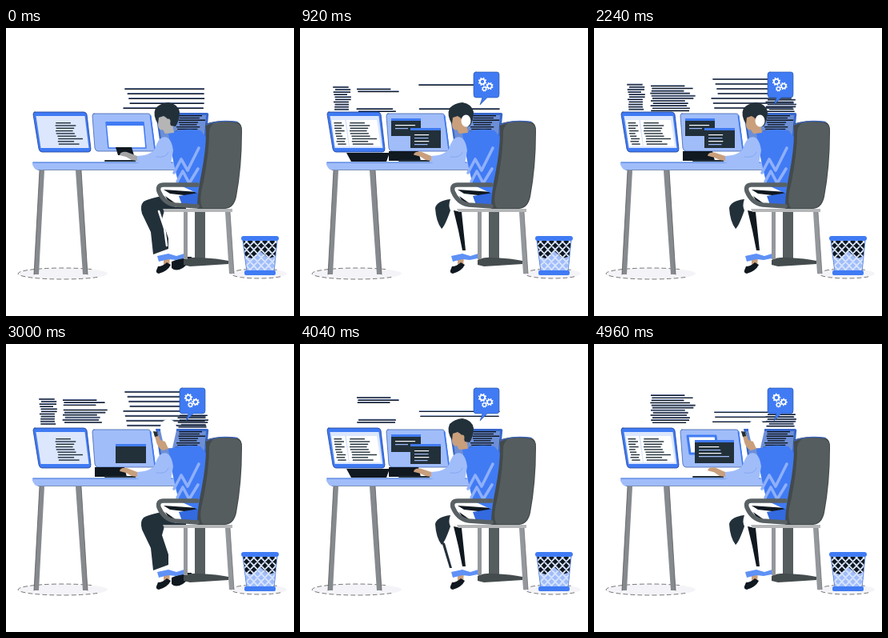
These frames come from a looping animation (360x360 px, 5 s). An HTML page with a canvas:

```html
<!DOCTYPE html>
<html lang="en">
<head>
<meta charset="utf-8">
<title>Programmer at work</title>
<style>
html, body { margin: 0; width: 100%; height: 100%; overflow: hidden; background: #fff; }
canvas { display: block; width: 100vmin; height: 100vmin; }
</style>
</head>
<body>
<canvas id="stage" width="360" height="360"></canvas>
<script>
const ctx = document.getElementById('stage').getContext('2d');
const LOOP = 5000;
const BLUE = '#407bf4', PALE = '#a0bdfa', ICE = '#dce7fd', INK = '#22303a', NIGHT = '#101820';
const GREY = '#868a8e', CHAIR = '#555d5f', SKIN = '#c99f7c', WHITE = '#fff';

// Scene phases switch hard at these times.
const CUTS = [460, 1280, 1940, 2620, 3520, 4500];
const phaseAt = t => CUTS.filter(cut => t >= cut).length;
const noise = n => { const s = Math.sin(n * 127.1 + 11.7) * 43758.5453; return s - Math.floor(s); };

function shape(d, fill, stroke, width = 1) {
  const path = new Path2D(d);
  if (fill) { ctx.fillStyle = fill; ctx.fill(path); }
  if (stroke) {
    ctx.strokeStyle = stroke;
    ctx.lineWidth = width;
    ctx.lineCap = ctx.lineJoin = 'round';
    ctx.stroke(path);
  }
}
function rect(x, y, w, h, fill, r = 0) {
  ctx.fillStyle = fill;
  ctx.beginPath();
  ctx.roundRect(x, y, w, h, r);
  ctx.fill();
}
function oval(x, y, rx, ry, fill) {
  ctx.fillStyle = fill;
  ctx.beginPath();
  ctx.ellipse(x, y, rx, ry, 0, 0, 7);
  ctx.fill();
}
function textRows(x, y, w, count, pitch, color, seed, slant = 0) {
  for (let i = 0; i < count; i++) {
    const indent = noise(seed + i) * w * 0.15;
    const length = (w - indent) * (0.6 + 0.4 * noise(seed + i + 40));
    rect(x + indent + i * slant, y + i * pitch, length, 1.4, color);
  }
}

// Rows of floating code: one mask per phase, drifting slowly upward.
const BLOCKS = [
  { x: 41, w: 23, top: 75, speed: 2.4, pitch: 3.1, seed: 3, ragged: 0.3, indent: 3,
    masks: ['', '1111111111', '1111111111', '11111111111', '11111111111', '', ''] },
  { x: 70, w: 58, top: 78, speed: 3, pitch: 3.1, seed: 17, ragged: 0.3, indent: 4,
    masks: ['', '1100000011', '1111111111', '11111111111', '1110111111', '11100000011', '111111111111'] },
  { x: 144, w: 107, top: 75, speed: 5.4, pitch: 6, seed: 31, ragged: 0.04, indent: 14,
    masks: ['11111', '1000011', '111101', '11111111', '11111111', '0000011', '000000111'] },
  { x: 214, w: 39, top: 90, speed: 0.6, pitch: 2.9, seed: 53, ragged: 0.1, indent: 5,
    masks: ['', '', '00011', '111111', '111111', '', '111111'] }
];
function floatingCode(t) {
  for (const block of BLOCKS) {
    for (let i = 0; i < 12; i++) {
      const shift = t < 250 || t > 4750 ? 0 : (noise(block.seed + i) - 0.5) * 360;
      if (block.masks[phaseAt(t + shift)][i] !== '1') continue;
      const y = block.top - block.speed * t / 1000 + i * block.pitch;
      if (y > 104) continue;
      const left = noise(block.seed + i) * block.indent;
      const right = noise(block.seed + i + 60) * block.w * block.ragged;
      const length = block.w - left - right;
      rect(block.x + left, y, length, 1.7, '#7187bd');
      rect(block.x + left, y + 0.7, length, 1.2, NIGHT);
    }
  }
}

function shadow(x, rx, ry) {
  oval(x, 307, rx, ry, '#f4f4f8');
  ctx.save();
  ctx.setLineDash([5, 4]);
  ctx.strokeStyle = '#555';
  ctx.lineWidth = 0.8;
  ctx.beginPath();
  ctx.ellipse(x, 307, rx, ry, 0, 0.7, 5.4);
  ctx.stroke();
  ctx.restore();
}

function desk() {
  shadow(71, 56, 7);
  shadow(316, 35, 6);
  shape('M42 178H48L41 308H35ZM87 178H94L102 308H96Z', GREY);
  shape('M42 178L35 308M94 178L102 308', null, '#4d4d4d', 0.7);
  shape('M33 167.5H225V177.5H39Q36 177 33 171Z', PALE);
  shape('M34 168.2H208', null, '#5b87df', 1.2);
  shape('M40 177.5H212', null, '#667ba8', 0.8);
}

function leftMonitor(phase) {
  shape('M36 105H97Q100 105 101 108L106 151Q106 155 103 155H45Q42 155 41 151L34 108Q34 105 36 105Z', BLUE, '#1d3f91', 0.8);
  shape('M37.5 110H98.5L103.5 150H43.5Z', ICE);
  const plain = phase === 0 || phase === 4;
  if (!plain) {
    shape('M40 115H56L61 148H44ZM58 115H96L101 148H62Z', WHITE);
    textRows(41.5, 118, 13, 9, 3.3, INK, 71, 0.5);
  }
  textRows(58, 118, 35, 9, 3.3, INK, 83, 0.5);
}

function editor(x, y, w, h, lines) {
  rect(x, y, w, h, INK);
  rect(x, y, w, 3, BLUE);
  for (let i = 0; i < lines; i++)
    rect(x + 5, y + 8 + i * 4, (w - 11) * (0.6 + 0.4 * noise(x + i)), 1.2, i % 2 ? PALE : WHITE);
}
function middleMonitor(phase) {
  shape('M110 107H178Q180 107 181 110L186 150Q186 154 183 154H115Q112 154 111 150L108 110Q108 107 110 107Z', PALE, '#3f62ae', 0.8);
  shape('M180.5 110L186 151', null, BLUE, 1.8);
  if (phase === 0) {
    shape('M125 118H172L175 150H128Z', WHITE, BLUE, 1.5);
    shape('M125 117H172L173 122H126Z', BLUE);
  } else if (phase === 4) {
    editor(137, 125, 38, 24, 0);
  } else if (phase === 6) {
    shape('M117 115H152L155 137H120Z', WHITE, BLUE, 3);
    editor(126, 120, 49, 29, 4);
  } else {
    editor(114, 113, 37, 22, 2);
    editor(138, 125, 38, 25, 4);
  }
}

function rightMonitor() {
  shape('M187 106H251Q254 106 253 110L249 154H194Z', '#3867cb');
  shape('M190 109H250L247 146H195Z', '#6d8fd6');
  textRows(212, 109, 39, 9, 2.8, NIGHT, 91, -0.2);
}

function deskGear(phase) {
  if (phase === 1 || phase === 5) shape('M58 156H112L108 167H64Z', NIGHT);
  if (phase === 0) shape('M137 149H157L160 159H140Z', NIGHT);
  else if (phase < 6) shape('M111 154H148L151 166H111Z', NIGHT);
  shape('M124 166H166', null, INK, 2);
}

function gear(x, y, r, angle) {
  ctx.save();
  ctx.translate(x, y);
  ctx.rotate(angle);
  for (let i = 0; i < 8; i++) {
    ctx.rotate(Math.PI / 4);
    rect(-r * 0.22, -r * 1.3, r * 0.44, r * 0.6, WHITE);
  }
  oval(0, 0, r, r, WHITE);
  oval(0, 0, r * 0.55, r * 0.55, BLUE);
  ctx.restore();
}
function bubble(t) {
  if (t < 600) return;
  shape('M220 55H246Q249 55 249 58V83Q249 87 246 87H234L225 96L228 87H220Q217 87 217 83V58Q217 55 220 55Z', BLUE, '#24519f', 0.6);
  const turn = t / LOOP * Math.PI * 2;
  gear(228, 67, 4, turn);
  gear(237, 72.5, 3.6, -turn);
  gear(230.5, 76, 2.7, -turn);
}

function legs(phase) {
  if (phase === 0 || phase === 4) {
    shape('M225 206Q184 210 172 217Q167 222 170 232L181 255L184 283L203 276L203 263L195 239L198 228H225Z', INK);
    if (phase === 0) shape('M191 229L198 250L201 272', null, WHITE, 2.5);
  } else {
    shape('M188 214Q171 216 169 225Q170 242 177 251Q181 248 188 228Q185 222 188 214Z', INK);
    shape('M192 228L202 230L207 278H203L198 253Z', NIGHT);
    if (phase === 5) shape('M177 247L181 249L190 280H187Z', INK);
  }
  shape('M197 285H205L204 298H197Z', SKIN);
  shape('M190 298Q196 298 201 293L206 296Q202 304 191 307Q187 306 188 303Z', NIGHT);
  shape('M207 292L223 286L232 286V291L221 300Q212 305 207 300Z', phase === 0 || phase === 4 ? NIGHT : WHITE);
  shape('M189 285L203 282L213 285L226 281L227 287L212 290L203 289L191 292Z', '#5f91f6');
}

function head(phase) {
  const hidden = phase === 4 || phase === 6;
  if (hidden) {
    shape('M193 108Q192 95 203 94Q214 95 213 108L208 130H198Z', WHITE);
    shape('M184 109L189 110L193 120L199 122L203 131L196 133Q189 130 187 119Z', SKIN);
    shape('M184 109L189 110L190 115L186 116Z', INK);
    return;
  }
  const face = phase === 0 ? '#b5b5b5' : SKIN;
  shape('M190 111L198 107L207 114L210 131L199 132L196 127Q191 129 190 121Z', face);
  shape('M187 100Q193 94 203 93Q215 95 217 105Q217 115 212 123L206 122Q204 113 197 110L191 112L190 120Q183 109 187 100Z', INK);
  if (phase > 0 && phase < 4) oval(207.5, 116, 6, 7.5, WHITE);
  else oval(203, 117, 2.5, 3.5, face);
}

function person(t, phase) {
  legs(phase);
  shape('M194 202Q215 198 240 201V224H212Q199 218 194 202Z', WHITE);
  shape('M197 202L240 205V211L205 207ZM199 210L213 220H205Z', NIGHT);
  shape('M216 210L241 206V223L220 221Z', '#336ae0');
  shape('M203 132Q222 124 243 128L253 140L242 208L216 196Q208 165 203 132Z', BLUE);
  shape('M210 181L219 164L227 178L241 150M214 192L221 179L229 194L240 176', null, '#8fb0fa', 3.6);

  head(phase);

  shape('M195 137Q206 133 209 153L206 170Q200 176 188 173L162 168V160Q182 160 187 149Q190 139 195 137Z', PALE);
  shape('M188 161Q201 163 203 155', null, '#7fa3eb', 0.8);
  const tap = Math.sin(t / 100 * Math.PI) * 0.7;
  shape(`M164 160L151 ${155 + tap}Q143 ${154 + tap} 142 ${159 + tap}L150 ${161 + tap}L157 165L164 166Z`, phase ? SKIN : '#a5a5a5');
}

function chair() {
  shape('M236 229H249V288L255 292H236Z', CHAIR);
  shape('M222 290Q230 286 242 287Q265 288 278 291V295L247 297L230 298L222 296Z', '#454c4e');
  shape('M222 230H227V289H222ZM274 230H280L285 307H279Z', '#94989c');
  shape('M280 230L285 307', null, '#666', 0.7);
  shape('M249 120Q265 114 288 117Q296 119 295 130Q295 174 288 211Q285 225 274 226H239Q239 206 244 183Q250 153 250 130Z', '#434a4c');
  shape('M263 118Q276 116 288 119Q295 121 294 130Q294 174 287 210Q284 224 273 225H246Q240 218 247 192Q254 155 254 129Q256 119 263 118Z', CHAIR);
  shape('M250 121Q267 114 289 117.5', null, '#3d66bd', 1.4);
  shape('M239 196H197Q189 196 191 204Q197 219 211 221L239 223', null, '#596164', 5.5);
  shape('M196 226H283V230H198Z', '#b4b6b8');
}

function basket() {
  const body = 'M296 265H339L335 305H301Z';
  ctx.save();
  ctx.clip(new Path2D(body));
  rect(294, 264, 48, 43, NIGHT);
  shape('M294 284L307 288L318 279L328 288L342 284V308H294Z', PALE);
  let lattice = '';
  for (let x = 250; x < 380; x += 9.2) lattice += `M${x} 262l44 48M${x} 262l-44 48`;
  shape(lattice, null, '#d9e5ff', 1.8);
  ctx.restore();
  shape('M296 266L301 305M339 266L335 305', null, '#6b91df', 1);
  rect(294, 260, 47, 6, BLUE, 3);
  rect(298, 303, 39, 6, BLUE, 2);
}

function draw(t) {
  const phase = phaseAt(t);
  rect(0, 0, 360, 360, WHITE);
  floatingCode(t);
  rightMonitor();
  desk();
  leftMonitor(phase);
  middleMonitor(phase);
  deskGear(phase);
  bubble(t);
  person(t, phase);
  chair();
  basket();
}

function tick() {
  draw(performance.now() % LOOP);
  requestAnimationFrame(tick);
}
tick();
</script>
</body>
</html>
```
